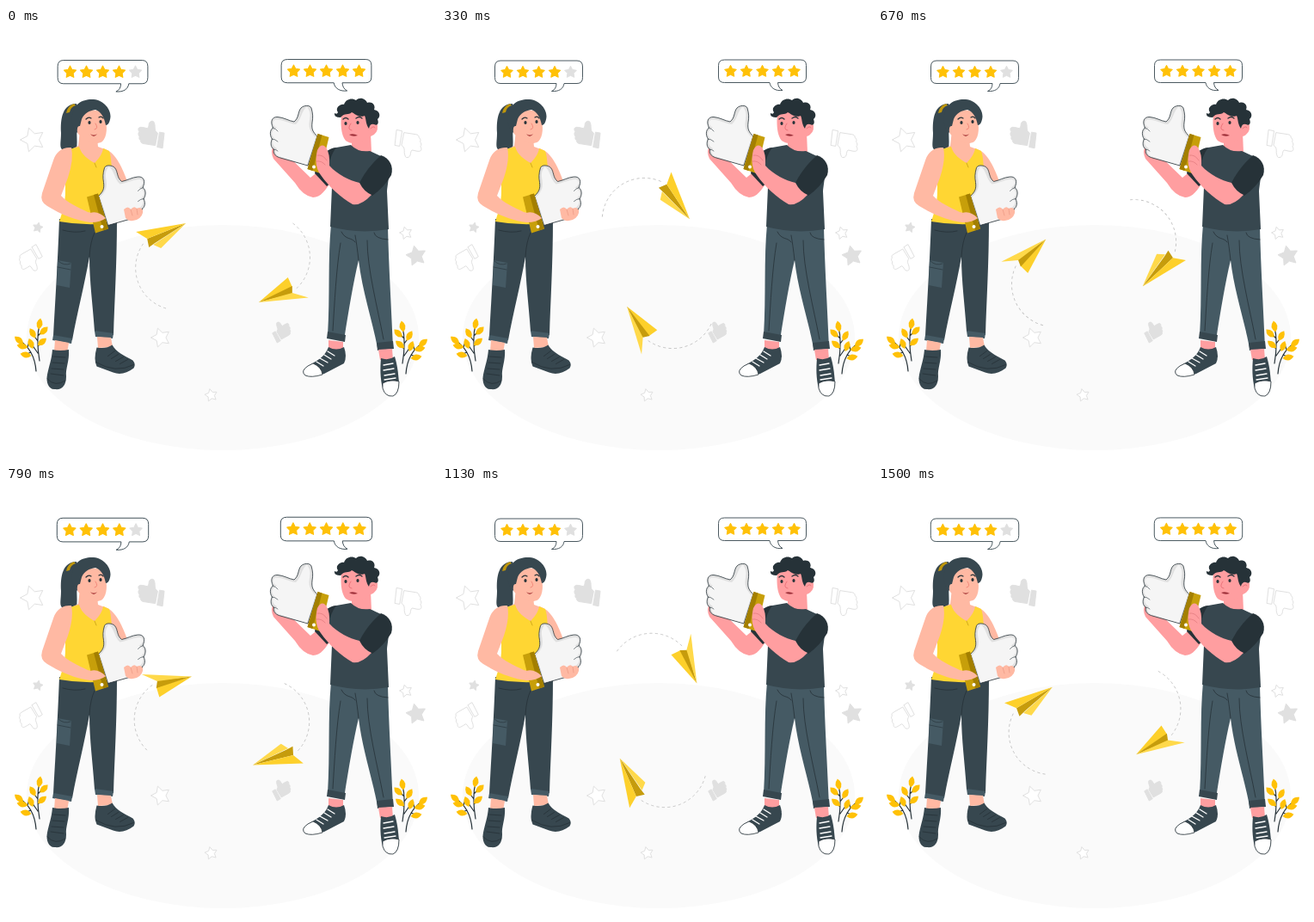
An HTML page that plays this animation: 500x500 px, repeating every 1.54 s.

```html
<!DOCTYPE html>
<html lang="en">
<head>
<meta charset="utf-8">
<title>Reviews</title>
<style>
  html, body { margin: 0; width: 100%; height: 100%; overflow: hidden; background: #fff; }
  svg { display: block; width: 100vw; height: 100vh; }
  .line { fill: none; stroke: #263238; stroke-width: .8; stroke-linecap: round; stroke-linejoin: round; }
  .ghost { fill: #fff; stroke: #e0e0e0; stroke-width: 1; stroke-linejoin: round; }
  .grey { fill: #e0e0e0; stroke: #e0e0e0; stroke-width: 1; stroke-linejoin: round; }
  .gold { fill: #ffc107; stroke: #ffc107; stroke-width: 1; stroke-linejoin: round; }
  .peach { fill: #ffb9a3; }
  .pink { fill: #ff9ea0; }
  .slate { fill: #37474f; }
  .steel { fill: #455a64; }
  .night { fill: #263238; }
  .lace { fill: none; stroke: #fff; stroke-width: 1.3; stroke-linecap: round; }
  .trail { fill: none; stroke: #c4c4c4; stroke-width: .9; stroke-dasharray: 3.2 3.2; }
  .bubble { fill: #fff; stroke: #37474f; stroke-width: .9; stroke-linejoin: round; }
</style>
</head>
<body>
<svg viewBox="0 0 500 500">
  <defs>
    <path id="fist" vector-effect="non-scaling-stroke" d="M362,126 C357,121 355,118 356,110 C357,104 357,100 355,93 C353,89 346,90 343,93 C339,98 341,104 335,109 C329,108 323,104 316,103.500 C309,103 307,109 310.500,116 C306,119 307,126 309.500,129 C307,134 308,139 311.500,141 C310,147 315,150 319,151 L351,160Z"/>
    <path id="cuff" vector-effect="non-scaling-stroke" d="M362.500,123 L375.500,127 L365.500,169 L350.500,164Z"/>
    <g id="bigThumb">
      <use href="#fist" fill="#e0e0e0" stroke="#263238" stroke-width=".8"/>
      <path fill="#f5f5f5" d="M360,127 C352,119 352,114 353,107 C354,101 354,96 350,92 C344,94 344,106 337,112 C328,111 319,105 312,107 C309,110 311,114 315,116 C309,118 307,124 312,128 C309,131 309,137 315,140 C312,144 314,149 320,150 L350,159Z"/>
      <path class="line" style="stroke-width:.6" d="M310,116 Q314,117 316,120 M309,129 Q313,129 316,132 M311,141 Q314,141 316,143"/>
      <use href="#cuff" fill="#c79f0a"/>
      <path fill="#a37f00" d="M362.500,123 L367.500,124.500 L356.500,166 L350.500,164Z"/>
      <circle cx="358" cy="161.500" r="2" fill="#fff"/>
    </g>
    <g id="icon"><use href="#fist"/><use href="#cuff" x="5" y="1"/></g>
    <g id="plant">
      <path class="line" style="stroke-width:1.2" d="M39,345 C35,360 37,375 39,387 M15,363 C28,371 34,385 35,399 M37,364 L31,356 M37,370 L43,364 M37,358 L43,352 M25,371 L27,365 M29,377 L22,380 M37,378 L30,368"/>
    </g>
  </defs>

  <ellipse cx="252" cy="360" rx="228" ry="131" fill="#fafafa"/>
  <g id="icons"></g>
  <use href="#plant"/>
  <use href="#plant" transform="translate(500 3) scale(-1 1)"/>

  <g id="woman">
    <path class="slate" d="M82,88 C66,88 63,105 64,122 C64,132 62,138 65,141 Q74,144 82,141 C84,130 80,118 85,104Z"/>
    <path class="peach" d="M112,140 C126,142 134,160 141,178 L150,205 L125,205 L113,160Z"/>
    <path class="peach" d="M86,119 L84,137 L74,142 L78,160 L100,162 L118,152 L115,141 L107,138 L106,128Z"/>
    <path class="slate" d="M62,222 L129,222 C129,275 126,320 125,357 L103,353 C101,322 97,295 97,266 C91,300 83,330 77,363 L55,358 C57,322 60,275 62,222Z"/>
    <path class="line" d="M97,266 Q98,248 103,238 M66,235 Q80,239 92,236"/>
    <path class="steel" d="M60,270 L76,273 L74,302 L59,299Z M55,357 L77,361 L76,367 L54,363Z M103,352 L125,355 L124,361 L104,359Z"/>
    <path class="line" style="stroke-width:.6" d="M60,278 L75,281 M61,271 Q67,277 75,274"/>
    <path fill="#ffd633" d="M74,141 L85,138 C88,148 96,153 103,157 C108,152 112,146 113,140 L120,143 C123,151 122,160 124,170 C127,184 127,205 129,226 Q95,231 62,225 C66,213 69,202 69,190 C69,168 70,152 74,141Z"/>
    <path class="line" style="stroke:#a37f00;stroke-width:.5" d="M103,157 L105,162"/>
    <path class="peach" d="M76,139 C66,138 58,144 55,154 L42,192 Q39,202 48,207 C64,217 82,224 98,226 L114,225 Q119,220 108,217 L95,214 C83,208 71,203 64,195 L72,174 Q79,153 76,139Z"/>
    <use href="#bigThumb" transform="translate(469.500 69.500) scale(-1 1)"/>
    <path class="peach" d="M98,215 Q107,212 116,221 Q110,226 99,226Z M137,211 Q142,206 145,211 Q149,206 152,210 Q157,207 159,212 Q160,219 152,223 Q143,226 139,221Z"/>
    <path class="line" style="stroke:#e8917c;stroke-width:.6" d="M145,211 L147,218 M152,210 L153,217"/>
    <path class="peach" d="M85,104 C94,92 112,93 115,105 C118,113 118,126 112,132 C106,136 97,134 93,129 L86,125 C81,122 81,113 85,112Z"/>
    <path class="slate" d="M77,102 C78,88 90,82 102,83 C114,84 122,95 121.500,103 C121,109 119,113 116,113 C114,103 110,97 104,95 C97,96 91,99 88,106 L86,114 Q82,113 83,122 C77,117 76,110 77,102Z"/>
    <path fill="#bd950c" d="M79,88 Q71,91 70,99 L74,98 Q75,92 81,90Z"/>
    <path class="line" style="stroke-width:1.2" d="M93,106 Q96,103 99,105 M108,104 Q111,102 113,105"/>
    <path class="line" style="stroke:#ed7d70" d="M104,111 Q108,117 103,118"/>
    <ellipse class="night" cx="97" cy="110" rx="1.600" ry="1.900"/>
    <ellipse class="night" cx="110" cy="109" rx="1.600" ry="1.900"/>
    <path fill="#a83a3a" d="M98,123 Q102,126 106,123 Q102,129 98,123Z"/>
    <path class="peach" d="M57,363 L73,366 L71,378 L56,376Z M106,359 L122,360 L124,371 L107,372Z"/>
    <path class="slate" d="M54,374 Q63,376 73,374 C74,387 69,396 70,405 C70,416 65,421 57,420 C50,421 46,412 48,403 C50,393 53,386 54,374Z"/>
    <g transform="translate(.5 1.500)">
      <path class="slate" d="M105,370 Q116,372 123,367 C127,375 138,380 147,385 Q151,390 148,394 C140,400 132,402 124,399 L105,392 Q101,384 105,370Z"/>
      <path class="line" d="M118,380 L126,374 M122,383 L130,378 M127,386 L136,381 M132,389 L141,384 M104,387 Q127,401 148,390"/>
    </g>
    <path class="line" d="M55,382 L69,383 M54,389 L68,390 M53,396 L67,397 M52,402 L67,404 M48,408 Q57,418 69,410"/>
  </g>

  <g id="man">
    <path class="pink" d="M364,166 L378,178 C372,188 366,197 357,197 Q345,195 336,180 L311,152 Q307,143 311,138 L324,145 L354,174Z"/>
    <path class="pink" d="M402,128 L402,141 Q413,149 425,145 L424,122Z"/>
    <path class="steel" d="M378,228 L444,231 C445,275 448,325 450,372 L432,372 C426,340 414,305 410,270 C404,295 399,325 393,363 L374,358 C377,310 374,270 378,228Z"/>
    <path class="slate" d="M374,353 L395,357 L394,365 L373,361Z M431,366 L450,364 L451,373 L432,375Z"/>
    <path class="line" d="M410,270 Q408,252 406,241 M390,237 C395,247 402,243 406,249 M389,250 C384,280 382,320 380,352 M420,247 C420,280 432,325 439,362 M428,238 Q429,245 444,246"/>
    <path class="night" d="M384,139 C370,140 362,155 359,169 L373,184 L388,172Z"/>
    <path class="slate" d="M384,139 L401,136 Q410,145 423,143 L436,149 C450,158 444,178 443,190 L445,234 Q410,240 377,231 L379,185 C372,165 376,150 384,139Z"/>
    <path class="night" d="M436,148 C446,151 451,161 448,171 Q440,185 426,195 Q416,190 411,180 Q420,162 436,148Z"/>
    <use href="#bigThumb"/>
    <path class="pink" d="M411,180 Q416,190 425,194 Q413,207 403,205 C390,198 375,184 366,171 C359,162 360,150 362,142 Q367,133 372,139 Q377,146 376,160 C386,171 399,177 411,180Z"/>
    <path class="line" style="stroke:#df777c;stroke-width:.7" d="M362,148 Q369,147 373,154 M361,155 Q367,154 371,159"/>
    <path class="pink" d="M390,100 C397,91 418,92 422,103 L423,113 Q429,108 432,113 Q433,123 424,126 L419,130 C413,136 400,135 395,131 C389,124 389,109 390,100Z"/>
    <path class="night" d="M389,104 Q381,104 382,99 Q385,101 386,98 C382,93 389,88 393,89 C395,82 403,81 407,84 C412,79 419,83 420,87 C427,85 430,91 428,95 C435,96 436,103 432,106 C434,111 432,114 428,112 Q423,111 422,117 C418,112 419,106 417,102 C410,105 405,99 402,98 C398,102 394,98 389,104Z"/>
    <path class="line" style="stroke-width:1.3" d="M392,106 Q395,103 398,106 M407,105 Q411,102 414,105"/>
    <ellipse class="night" cx="395" cy="111" rx="1.600" ry="1.900"/>
    <ellipse class="night" cx="409" cy="110" rx="1.600" ry="1.900"/>
    <path class="line" style="stroke:#e56a72" d="M401,111 Q396,118 402,119 M424,117 Q428,113 429,116"/>
    <path fill="#9d3039" d="M399,124 Q404,122 409,125 Q403,127 399,124Z"/>
    <path class="pink" d="M375,363 L392,365 L392,376 L375,375Z M433,374 L449,373 L450,386 L435,386Z"/>
    <path class="slate" d="M375,371 Q384,376 393,371 Q397,382 393,390 L370,402 Q355,407 348,404 Q342,399 351,393 C362,387 371,382 375,371Z"/>
    <path fill="#fff" stroke="#263238" stroke-width=".8" d="M357,390 Q367,394 368,403 Q355,407 348,404 Q342,399 351,393Z"/>
    <path class="slate" d="M436,384 Q445,387 452,382 C455,392 456,400 457,412 Q457,425 450,428 Q441,429 438,419 C435,407 435,396 436,384Z"/>
    <path fill="#fff" stroke="#263238" stroke-width=".8" d="M438,413 Q447,408 457,411 Q457,425 450,428 Q441,429 438,419Z"/>
    <path class="lace" d="M361,388 L369,393 M365,384 L374,389 M370,380 L378,385 M374,376 L382,381 M439,392 L450,390 M439,398 L451,396 M440,404 L452,402 M440,409 L453,407"/>
  </g>

  <g class="pulse" data-centre="112.500 55">
    <path class="bubble" d="M68,38 H157 Q163.500,38 163.500,45 V57.500 Q163.500,64.500 157,64.500 H142 C141,71 136,74 127.500,73.500 C131,72 133,69 133,64.500 H68 Q61.500,64.500 61.500,57.500 V45 Q61.500,38 68,38Z"/>
  </g>
  <g class="pulse" data-centre="372.500 54.500">
    <path class="bubble" d="M328.500,37 H417 Q423.500,37 423.500,43.500 V57 Q423.500,63.500 417,63.500 H390.500 Q391,70 396,72.500 C388,73.500 382,70 381,63.500 H328.500 Q321.500,63.500 321.500,57 V43.500 Q321.500,37 328.500,37Z"/>
  </g>

  <g id="planes">
    <g>
      <path class="trail" d="M-65.500,53 A49,49 0 0 1 -91,-23.500"/>
      <g transform="translate(-42.300 -46)">
        <path fill="#ffd94a" d="M0,0 L-29,29 L-38,25Z"/>
        <path fill="#c69c0c" d="M0,0 L-45,18 L-43,28 L-36,23Z"/>
        <path fill="#fdd02b" d="M0,0 L-58,10 L-45,18Z"/>
      </g>
    </g>
    <g transform="rotate(180)">
      <path class="trail" d="M-82,46 A49.500,49.500 0 0 1 -85,-31"/>
      <g transform="translate(-42.300 -46)">
        <path fill="#fdd02b" d="M0,0 L-34,29 L-39,18Z"/>
        <path fill="#c69c0c" d="M0,0 L-39,10 L-39,19Z"/>
        <path fill="#ffd94a" d="M0,0 L-58,5.500 L-39,11Z"/>
      </g>
    </g>
  </g>
</svg>
<script>
const LOOP = 1540, STEPS = 37;
const $ = selector => document.querySelector(selector);

function add(parent, tag, attributes) {
  const node = document.createElementNS('http://www.w3.org/2000/svg', tag);
  for (const name in attributes) node.setAttribute(name, attributes[name]);
  parent.append(node);
}

function star(parent, kind, x, y, radius, turn = 0) {
  const points = Array.from({ length: 10 }, (_, i) => {
    const r = i % 2 ? radius * .52 : radius;
    const a = (i * 36 - 90 + turn) * Math.PI / 180;
    return `${(x + r * Math.cos(a)).toFixed(2)},${(y + r * Math.sin(a)).toFixed(2)}`;
  });
  add(parent, 'polygon', { class: kind, points: points.join(' ') });
}

function thumb(kind, x, y, turn, sx, sy) {
  add($('#icons'), 'use', {
    href: '#icon', class: kind,
    transform: `translate(${x} ${y}) rotate(${turn}) scale(${sx} ${sy}) translate(-341 -129)`
  });
}

star($('#icons'), 'ghost', 31, 130, 14.5, -18);
star($('#icons'), 'grey', 37, 232, 6, 12);
star($('#icons'), 'ghost', 465, 238.5, 7.5, -14);
star($('#icons'), 'grey', 477, 265, 12, -12);
star($('#icons'), 'ghost', 180, 360, 11.5, -18);
star($('#icons'), 'ghost', 238.5, 427, 7.5, -12);
thumb('grey', 168, 124.5, -7, .41, .41);
thumb('grey', 321, 352.5, -13, -.29, .29);
thumb('ghost', 28, 269, -14, .37, -.37);
thumb('ghost', 468.5, 134, 173, .42, .42);

// x, y and tilt of each leaf
const leaves = [[39, 344, 10], [31, 355, -30], [44, 352, 45], [29, 367, -20], [42, 365, 50],
  [15, 363, -50], [19, 370, -80], [23, 380, -80]];
for (const [x, y, tilt] of leaves) {
  add($('#plant'), 'path', {
    fill: '#ffc107', d: 'M0,-6.500 Q7,0 0,6.500 Q-7,0 0,-6.500Z',
    transform: `translate(${x} ${y}) rotate(${tilt})`
  });
}

const bubbles = [...document.querySelectorAll('.pulse')];
for (let i = 0; i < 5; i++) {
  star(bubbles[0], i < 4 ? 'gold' : 'grey', 75.5 + i * 18.5, 51.5, 7.2);
  star(bubbles[1], 'gold', 335.5 + i * 18.5, 50.5, 7.2);
}

const knots = [[0, 0], [5, 47.5], [12, 119.5], [19, 188], [27, 268.5], [32, 320], [36, 351.5], [37, 360]];
function angleAt(step) {
  const i = knots.findIndex(([end]) => end > step);
  const [s0, a0] = knots[i - 1], [s1, a1] = knots[i];
  return a0 + (a1 - a0) * (step - s0) / (s1 - s0);
}

function beat(step) {
  const period = STEPS / 2, half = 4.6;
  const distance = Math.abs((step - 3 + period * 1.5) % period - period / 2);
  return distance < half ? 1 + .05 * (1 + Math.cos(Math.PI * distance / half)) : 1;
}

function draw() {
  // Steps start on the nearest 10 ms, hence the half-unit shift.
  const step = Math.floor((performance.now() + 5) % LOOP / LOOP * STEPS);
  $('#planes').setAttribute('transform', `translate(251.5 273) rotate(${angleAt(step)})`);
  for (const bubble of bubbles) {
    const [x, y] = bubble.dataset.centre.split(' ');
    bubble.setAttribute('transform', `translate(${x} ${y}) scale(${beat(step)}) translate(${-x} ${-y})`);
  }
  requestAnimationFrame(draw);
}
draw();
</script>
</body>
</html>
```
